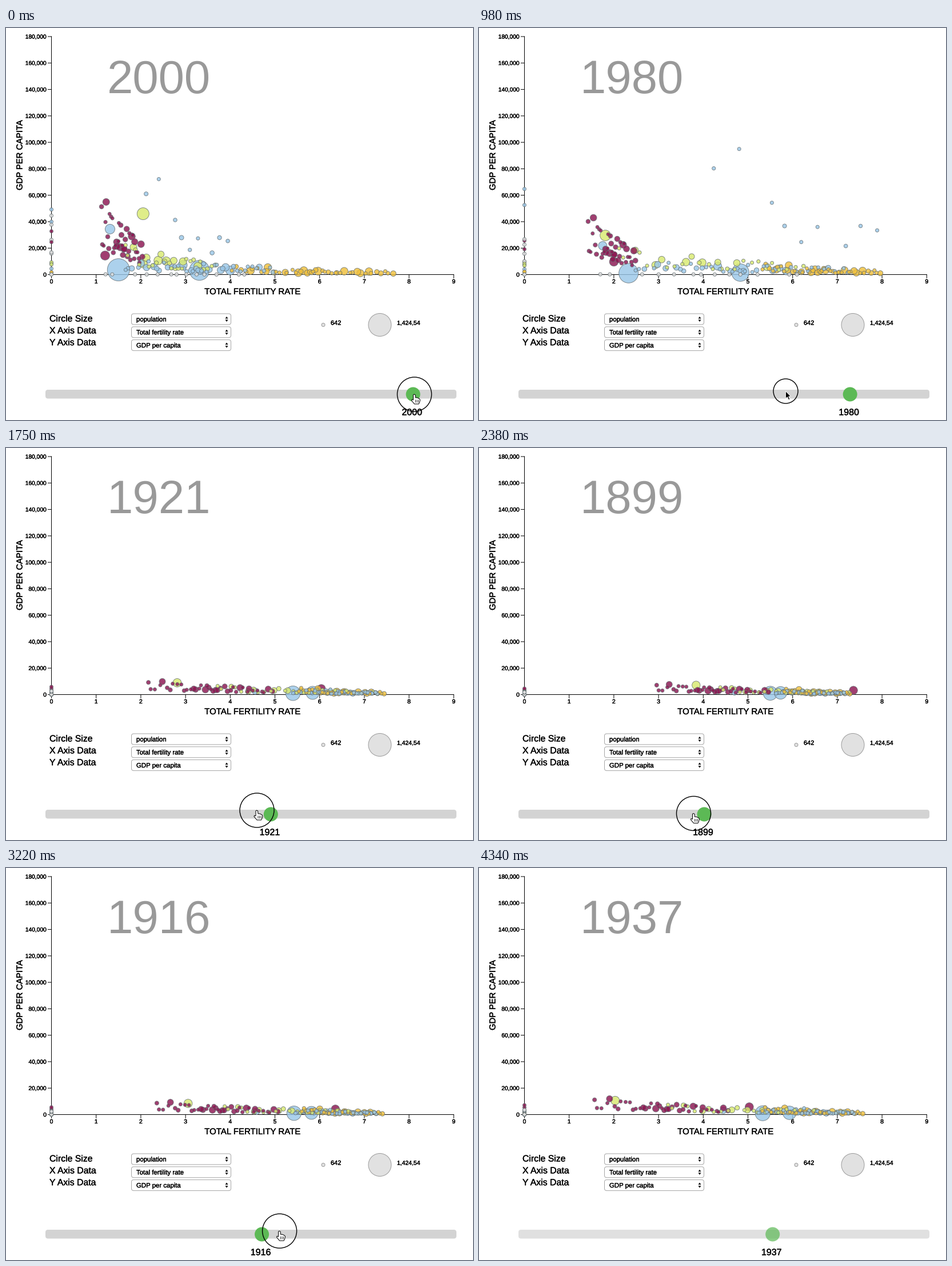
These frames come from a looping animation (817x686 px, 4.41 s). A matplotlib script:

```python
import numpy as np
import matplotlib.pyplot as plt
from matplotlib import patheffects
from matplotlib.animation import FuncAnimation
from matplotlib.patches import Circle, FancyBboxPatch, Polygon

W, H, DPI = 817, 686, 72          # at 72 dpi one point is one pixel
FRAMES, STEP = 63, 70
LEFT, BASE = 79.5, 431.5          # plot origin
UNIT_X, UNIT_Y = 78.2, 2.314      # one child, 1,000 in money

plt.rcParams["font.family"] = "Liberation Sans"
rng = np.random.default_rng(5)

# --- bubbles -------------------------------------------------------------
KEY_YEARS = [1900, 1937, 1980, 2000]
CRIMSON, BLUE, YELLOW, LIME, GREY = "#8b1450", "#9ac7e8", "#f0c03c", "#d9e96f", "#dfdfdf"

# Groups: color, count, largest radius, wealth spread, then at the key years
# lowest fertility, highest fertility, typical wealth in thousands
GROUPS = [
    (CRIMSON, 40, 6.8, 0.33, (2.9, 1.5, 1.4, 1.1), (5.5, 4.6, 2.5, 2.05), (3.2, 5, 18, 23)),
    (BLUE, 44, 8.5, 0.45, (5.6, 5.2, 2.4, 1.6), (7.2, 7.4, 7.3, 5), (1.2, 1.6, 4, 4.5)),
    (YELLOW, 46, 7, 0.45, (5.8, 5.3, 5.3, 4), (7.3, 7.6, 8, 7.7), (1.4, 1.8, 2.6, 2)),
    (LIME, 30, 7.5, 0.4, (4.3, 3.1, 2, 1.6), (7.3, 7.2, 6.3, 3.7), (2.2, 3, 8, 9)),
    (BLUE, 9, 4.5, 0.55, (6, 6, 4, 2), (7.2, 7.4, 8.4, 4.2), (1.5, 2.5, 50, 38)),
    (GREY, 13, 3.1, 0.2, (0, 0, 1.4, 1), (0, 0, 6.5, 4.6), (.1, .1, .1, .1)),
    (GREY, 3, 3.1, 0.6, (0, 0, 0, 0), (0, 0, 0, 0), (1, 2, 15, 25)),
]
# Giants: color, radius, then fertility and wealth at the key years
GIANTS = [
    (BLUE, 19.5, (5.5, 5.33, 2.33, 1.5), (1, 1, 1, 3.6)),
    (BLUE, 17.5, (5.73, 5.93, 4.83, 3.31), (1.3, 1.3, 1.5, 3.2)),
    (LIME, 10.5, (3.84, 2.03, 1.81, 2.05), (7.1, 10.6, 29.6, 46)),
    (BLUE, 8.5, (4.7, 4.45, 1.75, 1.31), (1.9, 3.2, 21.8, 34.4)),
    (CRIMSON, 8, (7.36, 5.03, 2, 1.2), (3.2, 5.8, 9.7, 14.4)),
]
GROWTH = {CRIMSON: 0.9, BLUE: 0.63, YELLOW: 0.82, LIME: 0.68, GREY: 1}
NO_DATA = 2   # countries per group that sit on the wealth axis


def members(color, count, r_max, spread, low, high, wealth):
    """Spread a group evenly over its fertility range, poorer with more children."""
    low, high, wealth = map(np.array, (low, high, wealth))
    for k in range(count + NO_DATA):
        q = 2 * (k + rng.uniform(0.1, 0.9)) / count - 1
        u = 0.5 + 0.5 * q * abs(q) ** 0.2
        luck = spread * rng.uniform(-1.6, 1.6) - (u - 0.5)
        r = 3 + (r_max - 3) * rng.random() ** 2.2
        if k < count:
            yield color, r, low + (high - low) * u, wealth * np.exp(luck)
        else:
            yield color, 3, 0 * low, wealth * np.exp(spread * rng.uniform(-1, 2))


bubbles = GIANTS + [b for g in GROUPS for b in members(*g)]
bubbles.sort(key=lambda b: -b[1])
colors = [b[0] for b in bubbles]
radius = np.array([b[1] for b in bubbles])
growth = np.array([GROWTH[c] for c in colors])
fertility = np.array([b[2] for b in bubbles], float)
log_wealth = np.log(np.array([b[3] for b in bubbles], float))


def positions(year):
    pos = np.interp(year, KEY_YEARS, range(4))
    k = min(int(pos), 2)
    mix = lambda a: a[:, k] + (a[:, k + 1] - a[:, k]) * (pos - k)
    x = LEFT + UNIT_X * mix(fertility)
    y = BASE - UNIT_Y * np.minimum(np.exp(mix(log_wealth)), 178)
    return np.column_stack([x, y])


def sizes(year):
    t = np.interp(year, KEY_YEARS, [0, 0.12, 0.66, 1])
    return (2 * np.maximum(radius * (growth + (1 - growth) * t), 3)) ** 2


# --- stage ---------------------------------------------------------------
fig = plt.figure(figsize=((W + 0.01) / DPI, (H + 0.01) / DPI), dpi=DPI, facecolor="white")
ax = fig.add_axes([0, 0, 1, 1])
ax.set(xlim=(0, W), ylim=(H, 0))
ax.axis("off")
SEMIBOLD = [patheffects.withStroke(linewidth=0.35, foreground="black")]


def text(x, y, s, size, ha="left", va="baseline", **kw):
    style = {"color": "black", "path_effects": SEMIBOLD, **kw}
    return ax.text(x, y, s, fontsize=size, ha=ha, va=va, **style)


def line(xs, ys, **kw):
    return ax.plot(xs, ys, **{"color": "black", "lw": 1, "zorder": 2, "snap": False, **kw})[0]


def box(x, y, w, h, r, **kw):
    patch = FancyBboxPatch((x, y), w, h, boxstyle=f"round,pad=0,rounding_size={r}", **kw)
    return ax.add_patch(patch)


line([LEFT, LEFT], [15, BASE])
line([LEFT, LEFT + 9 * UNIT_X], [BASE, BASE])
for i in range(10):
    x, y = LEFT + i * UNIT_X, BASE - 20 * i * UNIT_Y
    line([x, x], [BASE, BASE + 6])
    line([LEFT - 6, LEFT], [y, y])
    text(x, 447, str(i), 10.4, ha="center")
    text(71, y + 3.6, f"{20000 * i:,}", 10.2, ha="right")
text(431.5, 466, "TOTAL FERTILITY RATE", 15, ha="center")
text(31.5, 222.5, "GDP PER CAPITA", 14.8, ha="right", va="center", rotation=90)

for i, (name, choice) in enumerate((("Circle Size", "population"),
                                    ("X Axis Data", "Total fertility rate"),
                                    ("Y Axis Data", "GDP per capita"))):
    text(76, 513.6 + 20.8 * i, name, 15.8)
    y = 509.5 + 22.8 * i
    box(219.5, y - 9.5, 174, 19, 4, fc="white", ec="#a6a6a6", lw=1)
    text(228, y + 4, choice, 11.4)
    for d in (-1, 1):
        ax.add_patch(Polygon([(383.5, y + d), (388.5, y + d), (386, y + 4.6 * d)], fc="black"))

for x, r in ((555, 3), (654, 20)):
    ax.add_patch(Circle((x, 519.5), r, fc="#e1e1e1", ec="#9c9c9c", lw=1))
text(568, 519.5, "642", 11)
text(684, 519.5, "1,424,54", 10.4)

big_year = text(177, 114, "", 81.5, color="#999999", path_effects=[])
dots = ax.scatter(*positions(2000).T, s=sizes(2000), c=colors, alpha=0.82, zorder=3,
                  edgecolors="#626c70", linewidths=0.9)

track = box(69, 633, 719, 15.5, 4.5, fc="#d3d3d3", ec="none", zorder=4)
knob = ax.add_patch(Circle((0, 641), 12.5, fc="#5cb955", ec="none", zorder=5))
label = text(0, 677.5, "", 16, ha="center", zorder=5)

# --- pointer -------------------------------------------------------------
HAND = np.array([(-2, 1), (-0.5, 0), (1.5, 1), (2, 6), (5, 6), (9, 8), (10, 10), (9, 14),
                 (7.5, 17), (0, 17), (-5, 11), (-4.5, 9), (-2, 10)])
ARROW = np.array([(0, 0), (0, 13), (3, 10.3), (5.2, 15.3), (7.4, 14.3), (5.2, 9.4), (9.2, 9.4)])
FOLD_X = np.array([2, 2, np.nan, 4.5, 4.5, np.nan, 7, 7])
FOLD_Y = np.array([10, 14, np.nan] * 2 + [10, 14])

ring = ax.add_patch(Circle((0, 0), 30, fc="none", ec="black", lw=1.4, zorder=7))
hand = ax.add_patch(Polygon(HAND, fc="white", ec="black", lw=1, zorder=8))
arrow = ax.add_patch(Polygon(ARROW, fc="black", ec="white", lw=0.9, zorder=8))
folds = line(FOLD_X, FOLD_Y, lw=0.8, zorder=9)

YEAR_AT = ([0, 2, 8, 14, 16, 20, 25, 34, 37, 41, 45, 50, 54, 61],
           [2000, 2000, 1991, 1980, 1950, 1938, 1921, 1899, 1899, 1900, 1912, 1932, 1936, 1937])
POINTER_T = [0, 4, 14, 25, 34, 41, 50, 56]
POINTER_X = [714.5, 697, 536.5, 439, 375.5, 433, 515, 532]
POINTER_Y = [641, 640, 635.5, 634, 639.5, 630.5, 639, 650]


def draw(i):
    year = np.interp(i, *YEAR_AT)
    shown = int(round(year))
    big_year.set_text(str(shown))
    dots.set_offsets(positions(year))
    dots.set_sizes(sizes(year))

    x = 394 + 3.15 * (shown - 1899)
    knob.center = (x, 641)
    label.set_position((x - 2, 677.5))
    label.set_text(str(shown))
    fade = np.interp(i, [55, 59], [1, 0.7])
    knob.set_alpha(fade)
    track.set_alpha(fade)

    px, py = np.interp(i, POINTER_T, POINTER_X), np.interp(i, POINTER_T, POINTER_Y)
    present, released = i < 56, 11 <= i <= 16
    ring.center = (px, py)
    ring.set_radius(np.interp(i, [10, 12, 15, 17], [30, 21.5, 21.5, 30]))
    hand.set_xy(HAND + (px, py))
    arrow.set_xy(ARROW + (px, py))
    folds.set_data(FOLD_X + px, FOLD_Y + py)
    ring.set_visible(present)
    arrow.set_visible(present and released)
    for part in (hand, folds):
        part.set_visible(present and not released)
    return []


anim = FuncAnimation(fig, draw, frames=FRAMES, interval=STEP, repeat=True,
                     repeat_delay=0, blit=False)
plt.show()
```
